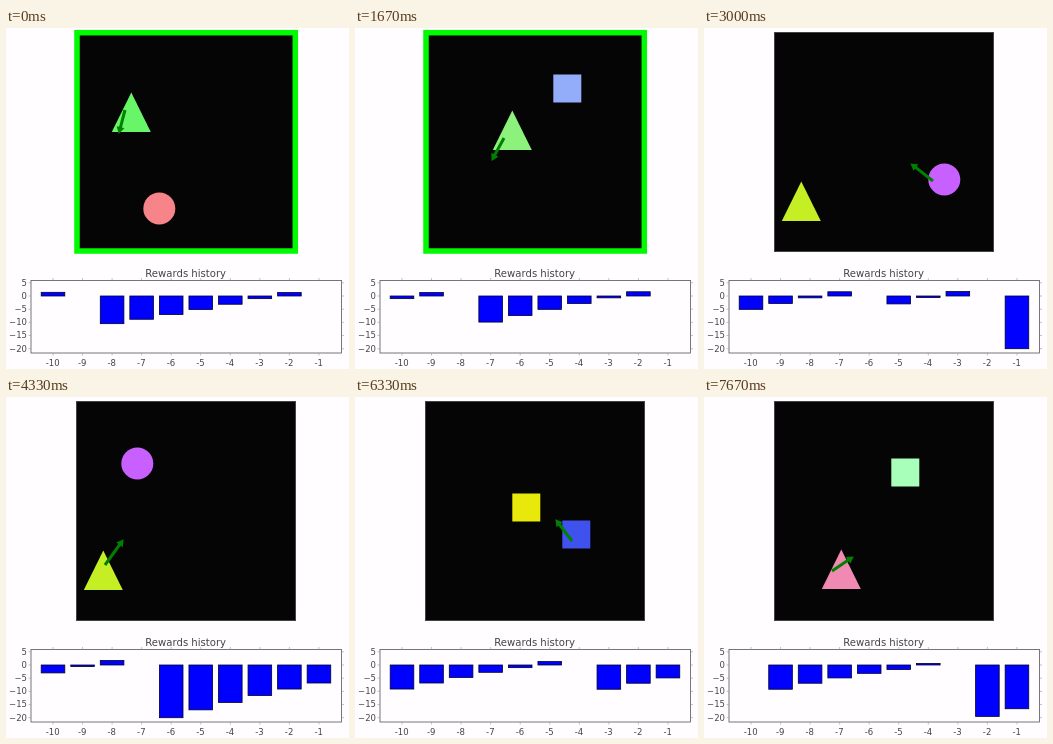
Animation of 343 by 341 pixels, one loop 8000 ms. Source, as an HTML page:

```html
<!DOCTYPE html>
<html lang="en">
<head>
<meta charset="utf-8">
<title>Rewards history</title>
<style>
  html, body { margin: 0; width: 100%; height: 100%; overflow: hidden; background: #fffdff; }
  svg { display: block; width: 343px; height: 341px; }
  text { font: 8.5px "DejaVu Sans", sans-serif; fill: #444; }
  .title { font-size: 10.1px; }
  .axis { fill: none; stroke: #555; stroke-width: .8; }
  .tick { stroke: #999; stroke-width: .6; }
  .bar { fill: #00f; stroke: #000030; stroke-width: .8; }
</style>
</head>
<body>
<svg viewBox="0 0 343 341">
  <rect x="70.5" y="4.5" width="219" height="219" fill="#050505" stroke="#444"/>
  <g id="world"></g>
  <g id="bars"></g>
  <g id="axes"></g>
</svg>
<script>
const LOOP = 8000, FPS = 3, SLOTS = 10;
const $ = id => document.getElementById(id);

// grip: where the arrow takes hold, from the centre; path: key points [step, x, y]
const item = (kind, color, grip, ...path) => ({ kind, color, grip, path });

// Penalties run from first to last over count steps, bent by bend, then a bonus follows
const tasks = [
  { first: -10.5, last: -1, count: 6, bend: -.15 },
  { first: -9.9, last: -.7, count: 5, bend: .1, items: [
    item('tri', '#68f568', [-6, -2], [0, 125, 84], [1, 119, 107], [5, 105, 168]),
    item('disc', '#f68489', [0, 0], [0, 153, 180])] },
  { first: -3, last: -.6, count: 2, bend: 0, items: [
    item('tri', '#8cf27c', [-8, 8], [0, 157, 102], [2, 133, 146]),
    item('box', '#93adfa', [-4, -7], [2, 212, 60], [4, 194, 100])] },
  { first: -20, last: -1, count: 9, bend: .29, items: [
    item('disc', '#c860ff', [-11, 2], [0, 264, 180], [1, 240, 151], [6, 131, 66]),
    item('tri', '#c6ee24', [2, -5], [6, 97, 173], [7, 115, 148], [10, 178, 118])] },
  { first: -9.2, last: -1.7, count: 5, bend: .29, items: [
    item('box', '#4052ee', [-4, 7], [1, 253, 179], [6, 173, 74]),
    item('box', '#e8e80a', [0, 0], [0, 171, 110])] },
  { first: -19.5, last: -1, count: 9, bend: .29, items: [
    item('tri', '#f08ab2', [-9, 2], [0, 104, 198], [2, 137, 172], [3, 158, 158]),
    item('box', '#a8ffb9', [0, 0], [0, 201, 75])] }
];

function rewardAt({ first, last, count, bend }, step) {
  if (step === 0) return 0;
  if (step > count) return last + 2.3;
  const u = (step - 1) / (count - 1);
  return first + (last - first) * (u + bend * u * (1 - u));
}

const history = [{ reward: 1.4 }];
for (const task of tasks)
  for (let step = 0; step <= task.count + 1; step++)
    history.push({ task, step, reward: rewardAt(task, step) });

function placeAt({ path }, step) {
  const next = path.findIndex(key => key[0] > step);
  if (next <= 0) return (next ? path[path.length - 1] : path[0]).slice(1);
  const [s0, x0, y0] = path[next - 1], [s1, x1, y1] = path[next];
  const u = (step - s0) / (s1 - s0);
  return [x0 + (x1 - x0) * u, y0 + (y1 - y0) * u];
}

const rect = (x, y, w, h, attrs) =>
  `<rect x="${x}" y="${y}" width="${w}" height="${h}" ${attrs}/>`;

function drawItem({ kind, color }, [x, y]) {
  const attrs = `fill="${color}" transform="translate(${x + .3} ${y + .5})"`;
  if (kind === 'disc') return `<circle r="16" ${attrs}/>`;
  if (kind === 'box') return rect(-14, -14, 28, 28, attrs);
  return `<path d="M0 -20L19.5 19.5H-19.5z" ${attrs}/>`;
}

function drawArrow(x, y, dx, dy) {
  const angle = Math.atan2(dy, dx) * 180 / Math.PI;
  const len = Math.hypot(dx, dy);
  return `<path transform="translate(${x} ${y}) rotate(${angle})" fill="#008000"
    d="M0 -1.5H${len - 6}V-4L${len + 1} 0L${len - 6} 4V1.5H0z"/>`;
}

// The arrow shows the next push on whichever item is about to move
function drawWorld({ task, step }) {
  const views = task.items.map(it => {
    const at = placeAt(it, step), to = placeAt(it, step + 1);
    return { it, at, push: [to[0] - at[0], to[1] - at[1]] };
  });
  const active = views.find(v => v.push[0] || v.push[1]) || views[0];
  const { it, at, push } = active;
  const frame = step ? '' :
    rect(71, 4.7, 218.3, 218.3, 'fill="none" stroke="#00fa00" stroke-width="5.5"');
  return frame + views.reverse().map(v => drawItem(v.it, v.at)).join('') +
    drawArrow(at[0] + it.grip[0], at[1] + it.grip[1], ...push);
}

const slotX = i => 47 + i * 29.55;
const valueY = v => 268 - v * 2.635;

const drawBars = entries => entries.map(({ reward }, i) => reward
  ? rect(slotX(i) - 11.8, valueY(Math.max(reward, 0)), 23.6,
    Math.abs(reward) * 2.635, 'class="bar"')
  : '').join('');

function drawAxes() {
  const [left, top, right, bottom] = [25, 252.5, 335.5, 325];
  const label = (x, y, anchor, text, cls = '') =>
    `<text x="${x}" y="${y}" text-anchor="${anchor}" class="${cls}">${text}</text>`;
  let out = rect(left, top, right - left, bottom - top, 'class="axis"');
  let ticks = '';
  for (let i = 0; i < SLOTS; i++) {
    const x = slotX(i);
    ticks += `M${x} ${top}v-2.5M${x} ${bottom}v2.5`;
    out += label(x - .3, 338, 'middle', i - SLOTS);
  }
  for (let v = 5; v >= -20; v -= 5) {
    const y = valueY(v);
    ticks += `M${left} ${y}h-2.5M${right} ${y}h2.5`;
    out += label(21, y + 2.9, 'end', String(v).replace('-', '\u2212'));
  }
  return out + `<path class="tick" d="${ticks}"/>` +
    label(179.7, 248.5, 'middle', 'Rewards history', 'title');
}

// The world takes four steps a second but is shown three times a second
let shown = -1;
function tick(now) {
  const k = Math.floor((now % LOOP) * FPS / 1000 + .011) % (LOOP * FPS / 1000);
  const step = Math.floor((4 * k + 1) / 3);
  if (step !== shown) {
    shown = step;
    const recent = history.slice(step, step + SLOTS);
    $('world').innerHTML = drawWorld(recent[SLOTS - 1]);
    $('bars').innerHTML = drawBars(recent);
  }
  requestAnimationFrame(tick);
}

$('axes').innerHTML = drawAxes();
tick(0);
</script>
</body>
</html>
```
